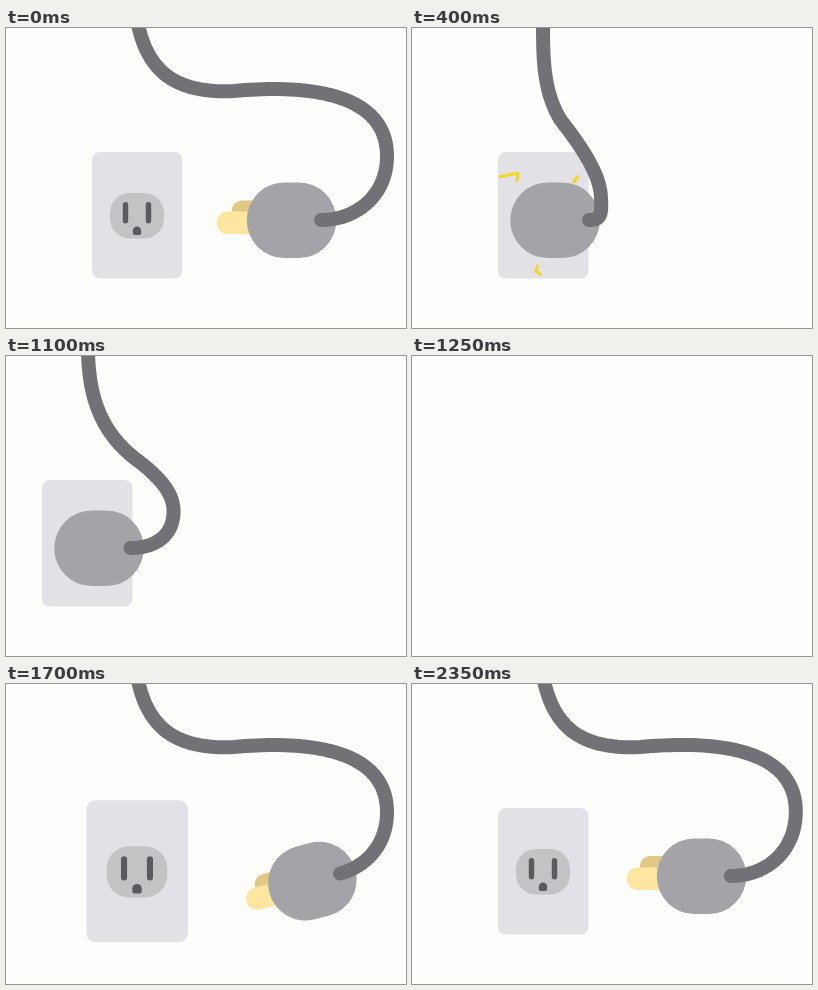
Animation, 400 px wide and 300 px high, one loop 2.4 s. Source, as an HTML page with a canvas:

```html
<!DOCTYPE html>
<html lang="en">
<head>
<meta charset="utf-8">
<title>Plug and socket</title>
<style>
  html, body { margin: 0; width: 100%; height: 100%; overflow: hidden; background: #fdfefc; }
  canvas { display: block; width: 400px; height: 300px; }
</style>
</head>
<body>
<canvas id="stage" width="400" height="300"></canvas>
<script>
const ctx = document.getElementById('stage').getContext('2d');
const LOOP = 2400, STEP = 50;
const REST_X = 285.5, TRAVEL = 142.5, PULL = 17, LEAD_IN = 60;
const HIT = 340, RELAX = 400, EXIT = 950, SWAP = 1300, ENTER = 1348, ARRIVE = 1748, PEAK = 2000;

const COLOR = {
  back: '#fdfefc', plate: '#e2e1e5', face: '#c3c3c5', slot: '#5b5a5e',
  body: '#a4a4a8', cord: '#727175', prong: '#fde6a0', prongFar: '#e2c886', spark: '#f7d326'
};

// Cord poses: a start point followed by three cubic segments.
const FREE   = [131,-8, 140,38, 163,66, 228,63, 305,56, 381,66, 381,128, 381,168, 350,192, 315,192];
const PULLED = [131,-8, 140,38, 163,66, 228,63, 313,55, 393,64, 393,126, 393,165, 368,192, 331,192];
const TIGHT  = [131,-8, 131,30, 131,62, 148,91, 168,117, 189,146, 189,171, 190,188, 188,192, 177,192];
const SLACK  = [132,-8, 133,30, 140,72, 184,104, 210,121, 223,135, 223,152, 223,175, 205,192, 174,192];

const SPARKS = [
  { path: [[105,154], [106,145], [87,149], [85,137]], from: 316 },
  { path: [[161,155], [168,146], [173,149], [184,133]], from: 370 },
  { path: [[126,237], [124,243], [130,248], [126,264]], from: 348 }
];

const clamp = v => Math.max(0, Math.min(1, v));
const span = (t, a, b) => clamp((t - a) / (b - a));
const lerp = (a, b, k) => a + (b - a) * k;
const mix = (a, b, k) => a.map((v, i) => lerp(v, b[i], k));
const smooth = u => u * u * (3 - 2 * u);
const backOut = (u, s = 2) => 1 + (s + 1) * (u - 1) ** 3 + s * (u - 1) ** 2;

function roundBox(x, y, w, h, r, color) {
  ctx.fillStyle = color;
  ctx.beginPath();
  ctx.roundRect(x, y, w, h, r);
  ctx.fill();
}

function strokeLine(points, width, color, cap) {
  ctx.strokeStyle = color;
  ctx.lineWidth = width;
  ctx.lineCap = cap;
  ctx.lineJoin = 'round';
  ctx.beginPath();
  points.forEach(([x, y]) => ctx.lineTo(x, y));
  ctx.stroke();
}

function sampleCord(pose) {
  const points = [[pose[0], pose[1]]];
  for (let i = 0; i < 18; i += 6) {
    for (let n = 1; n <= 40; n++) {
      const u = n / 40, v = 1 - u;
      const at = k => v ** 3 * pose[i + k] + 3 * v * v * u * pose[i + 2 + k] +
        3 * v * u * u * pose[i + 4 + k] + u ** 3 * pose[i + 6 + k];
      points.push([at(0), at(1)]);
    }
  }
  return points;
}

function pathLength(points) {
  let sum = 0;
  for (let i = 1; i < points.length; i++) {
    sum += Math.hypot(points[i][0] - points[i - 1][0], points[i][1] - points[i - 1][1]);
  }
  return sum;
}

// The part of a polyline between two distances; a negative end runs backwards off its start.
function trim(points, start, end) {
  const out = [];
  let done = 0, angle = 0;
  for (let i = 1; i < points.length; i++) {
    const [ax, ay] = points[i - 1], [bx, by] = points[i];
    const len = Math.hypot(bx - ax, by - ay);
    const put = d => out.push([lerp(ax, bx, d / len), lerp(ay, by, d / len)]);
    angle = Math.atan2(by - ay, bx - ax);
    if (done + len > start) {
      if (!out.length) put(Math.max(0, start - done));
      put(Math.min(len, end - done));
    }
    done += len;
    if (done >= end) break;
  }
  return { points: out, angle };
}

function scaled(x, y, k, draw) {
  if (k <= 0) return;
  ctx.save();
  ctx.translate(x, y);
  ctx.scale(k, k);
  draw();
  ctx.restore();
}

function drawSocket(plateScale, faceScale) {
  scaled(131, 187.3, plateScale, () => roundBox(-45, -63.3, 90.5, 126.6, 8, COLOR.plate));
  scaled(131, 187.5, faceScale, () => {
    roundBox(-27, -22.5, 54, 45.5, 20, COLOR.face);
    for (const x of [-11.5, 11.5]) roundBox(x - 2.7, -13.5, 5.4, 21.5, 2.7, COLOR.slot);
    roundBox(-4.2, 11, 8.4, 8.5, [4.2, 4.2, 2, 2], COLOR.slot);
  });
}

function drawSparks(t) {
  for (const { path, from } of SPARKS) {
    const total = pathLength(path);
    const head = total * clamp((t - from) / 120);
    const tail = total * clamp((t - from - 85) / 200);
    if (head > tail) strokeLine(trim(path, tail, head).points, 3, COLOR.spark, 'butt');
  }
}

function drawPlug(cord, angle, reach, size, prongs, swing) {
  const [x, y] = cord[cord.length - 1];
  ctx.save();
  ctx.translate(x, y);
  ctx.rotate(angle - Math.PI);
  ctx.translate(-reach, 0);
  ctx.scale(size, size);
  if (prongs > 0) {
    const near = 30 * prongs, far = (15 + 8 * swing) * prongs;
    roundBox(-44.7 - far, -19.5 - 2 * swing, far + 44, 22, 10, COLOR.prongFar);
    roundBox(-44.7 - near, -8.5 - swing / 2, near + 44, 22.5, 11, COLOR.prong);
  }
  roundBox(-44.7, -37.5, 89.5, 75.5, 37.5, COLOR.body);
  ctx.restore();
  strokeLine(cord, 14, COLOR.cord, 'round');
}

function plugState(t) {
  if (t < HIT) {
    const run = 0.09 * t + (TRAVEL - 0.09 * HIT) * (t / HIT) ** 3;
    return { offset: -run, pose: mix(FREE, TIGHT, run / TRAVEL), swing: 0, travel: 1,
      prongs: clamp((TRAVEL - run) / 60) };
  }
  if (t < SWAP) {
    // The cord springs out to full slack, then settles a little tighter.
    const slack = 0.84 * backOut(span(t, RELAX, RELAX + 668), 2.5);
    return { offset: -TRAVEL, pose: mix(TIGHT, SLACK, t < RELAX ? 0 : slack),
      swing: 0, travel: 1, prongs: 0 };
  }
  const swing = t < PEAK
    ? Math.sin(span(t, ARRIVE, PEAK) * Math.PI / 2)
    : 1 - ((t - PEAK) / (LOOP - PEAK)) ** 2;
  const grow = span(t, 1640, 1900);
  return { offset: PULL * swing, pose: mix(FREE, PULLED, swing), swing,
    travel: smooth(span(t, ENTER, ARRIVE)), prongs: grow ? backOut(grow) : 0 };
}

function render(t) {
  const arriving = t >= SWAP;
  ctx.fillStyle = COLOR.back;
  ctx.fillRect(0, 0, 400, 300);
  ctx.save();
  if (!arriving && t > EXIT) ctx.translate(-50 * ((t - EXIT) / 150) ** 3, 0);

  const pop = start => arriving ? (t > start ? backOut(span(t, start, start + 400)) : 0) : 1;
  drawSocket(pop(1446), pop(1498));
  drawSparks(t);

  const { offset, pose, swing, travel, prongs } = plugState(t);
  if (travel > 0) {
    const full = sampleCord(pose);
    const end = lerp(-LEAD_IN, pathLength(full), travel);
    const { points, angle } = trim(full, 0, end);
    const reach = (pose[18] - REST_X - offset) * lerp(0.42, 1, travel);
    const heading = travel === 1 ? Math.PI : angle;
    drawPlug(points, heading, reach, lerp(0.86, 1, travel), prongs, swing);
  }
  ctx.restore();
}

const began = performance.now();
function tick() {
  const t = (performance.now() - began) % LOOP;
  render(Math.floor(t / STEP) * STEP);
  requestAnimationFrame(tick);
}
tick();
</script>
</body>
</html>
```
